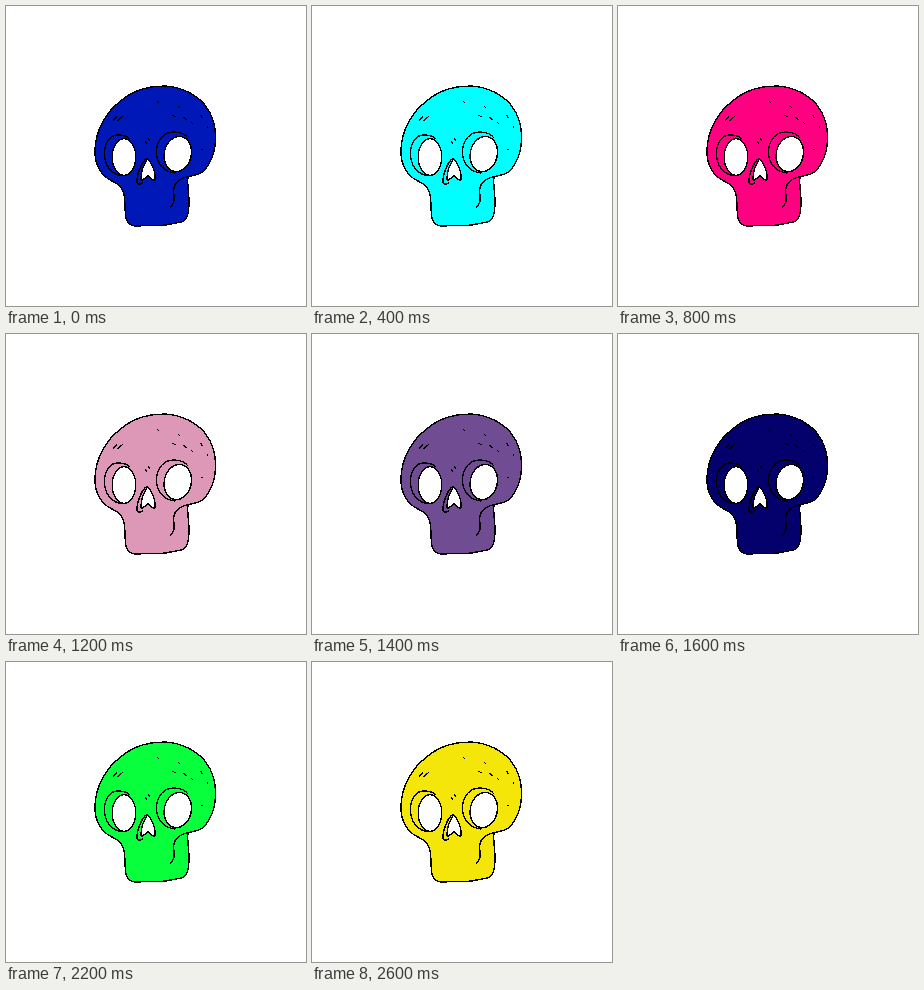
Recreate the animation shown at these times as an HTML page. Size 300x300 px, loop 2800 ms.

```html
<!DOCTYPE html>
<html lang="en">
<head>
<meta charset="utf-8">
<title>Colour-changing skull</title>
<style>
  html, body { margin: 0; width: 100%; height: 100%; overflow: hidden; background: #fff; }
  svg { display: block; width: 100vw; height: 100vh; }
</style>
</head>
<body>
<svg viewBox="0 0 300 300" fill="none" stroke="#000" stroke-width="1.4" stroke-linecap="round" stroke-linejoin="round" shape-rendering="crispEdges">
  <path id="skull" fill="#0018b8" d="M118.5 191C118 183 113 178 106 175C95 170 89 159 89 146C89 131 95 116 105 104C115 93 129 84 143 81.500C148 80 154 80.500 159 80C175 81 190 88 199 99C207 109 210 121 209.500 134C209 149 202 163 194 167.500C190 169.500 186 169 182 171C181 179 183 187 183 196C183 206 182 213 177 215.500C171 217 166 217.500 160 219C150 220 139 219.500 129 220C123 219 120 216 119.500 210C119 203 119 197 118.500 191Z"/>

  <!-- eye sockets -->
  <path d="M116 169.500C106 169 98.500 160 98.500 148C98.500 136 104 129 112 129C117 129 121 130 124 133"/>
  <ellipse cx="118" cy="151" rx="11.800" ry="18.300" fill="#fff"/>
  <path d="M169 167C158 166 150.500 158 150.500 146C150.500 134 158 126 168 126C174 126 179 128 182 132"/>
  <ellipse cx="171.800" cy="148" rx="13.500" ry="17.800" transform="rotate(12 171.800 148)" fill="#fff"/>

  <!-- nose -->
  <path d="M141 152.500C136 155 132 166 131 173C130 178 133 179 137 177"/>
  <path fill="#fff" d="M141.500 153C138 158 135 166 135 173C135 176 139 172 142 170C145 172 147 175 149 174C150 168 146 156 141.500 153Z"/>

  <!-- cheek -->
  <path d="M182 170.500C176 172 170 175 168.500 180C166 186 170 193 167 198L164.500 201"/>

  <!-- specks -->
  <path stroke-width="1.2" d="M107 115l4-5M112 114.500l5-4.500M151 95l2 2M139 135l2 3M142 132l2 3M167 109.500l2 1M172 100l2 2M177 111l4 3M185 116l2 2M195 109.500l1 2M201 120l1 2M196 143.500l.5 0"/>
</svg>
<script>
  const STEP = 200;
  const colours = [
    "#0018b8", "#008cdc", "#00ffff", "#8080c0", "#ff0080", "#ee4c9c", "#dd98b8",
    "#704c92", "#04006c", "#05555c", "#07aa4c", "#08ff3c", "#7ff323", "#f5e60a"
  ];
  const skull = document.getElementById("skull");
  const start = performance.now();

  function draw() {
    const step = Math.floor((performance.now() - start) / STEP);
    skull.setAttribute("fill", colours[step % colours.length]);
    requestAnimationFrame(draw);
  }
  draw();
</script>
</body>
</html>
```
